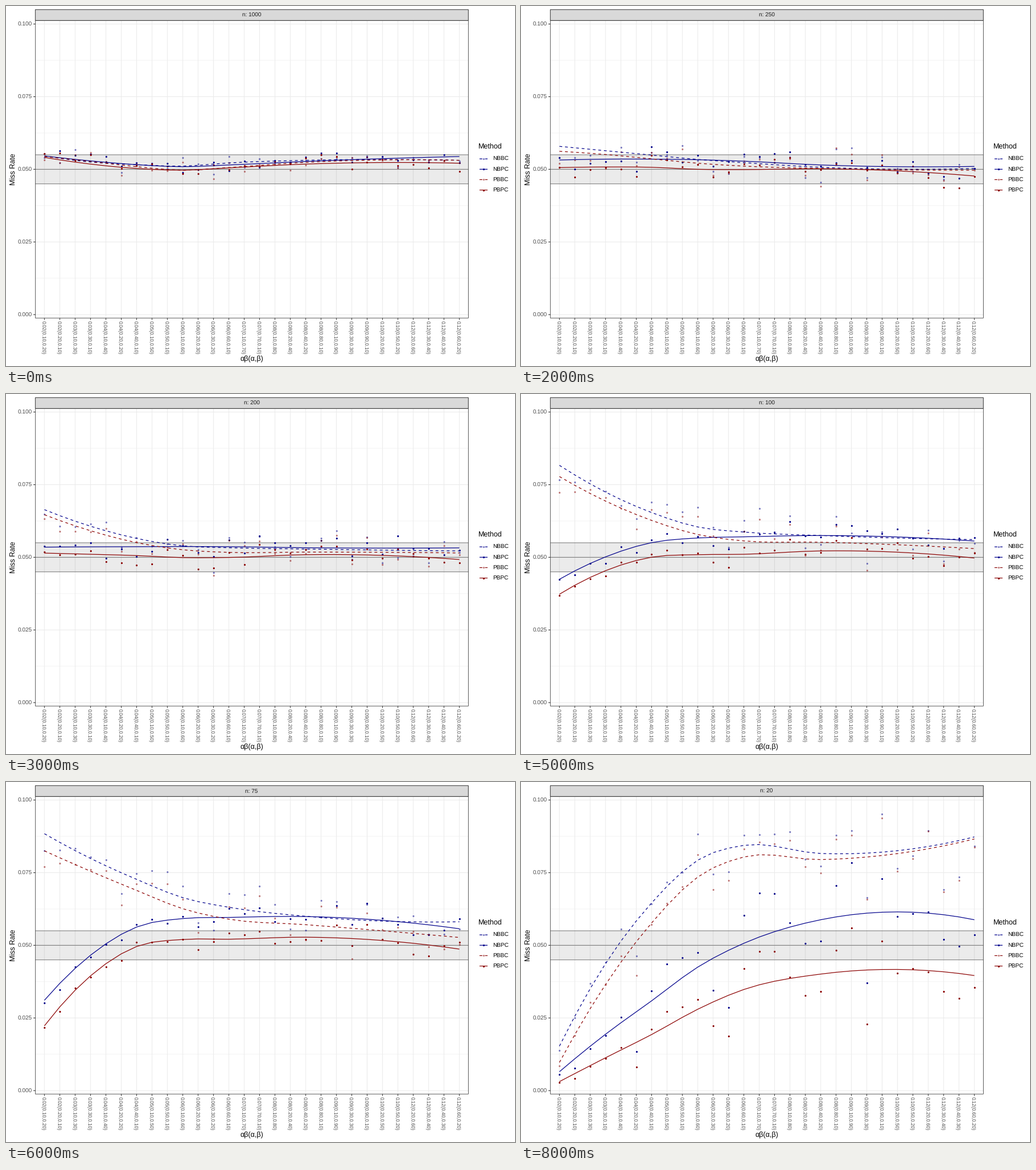
These frames come from a looping animation (890x629 px, 9 s). A matplotlib script:

```python
import numpy as np
import matplotlib.pyplot as plt
from matplotlib.animation import FuncAnimation
from matplotlib.patches import Rectangle

W, H, DPI = 890, 629, 100
PX = 72 / DPI
LEFT, RIGHT, TOP, BOTTOM = 51.3, 808.4, 25.3, 545.2
BLUE, RED = "#00008B", "#8B0000"
GRID, TEXT, EDGE = "#EBEBEB", "#4D4D4D", "#333333"
METHODS = [("NBBC", BLUE, True), ("NBPC", BLUE, False),
           ("PBBC", RED, True), ("PBPC", RED, False)]

# Every pair of tenths whose product lies in 0.02 .. 0.12
PAIRS = sorted(((a, b) for a in range(1, 10) for b in range(1, 10)
                if 2 <= a * b <= 12), key=lambda p: (p[0] * p[1], p[0]))
COUNT = len(PAIRS)
XS = 67.2 + 26.87 * np.arange(COUNT)
KEYS = np.array([0, 3, 6, 9, 12, 17, 27])

# Balanced pairs score low, lopsided pairs high
BALANCE = np.array([abs(np.log2(a / b)) for a, b in PAIRS]) - 1.7


def ypix(rate):
    return 539.2 - 5077 * np.asarray(rate)


def smooth(values):
    """Cubic Hermite curve through the key categories."""
    v = np.asarray(values, float)
    m = np.gradient(v, KEYS, edge_order=2)
    x = np.arange(COUNT)
    i = np.clip(np.searchsorted(KEYS, x, "right") - 1, 0, len(KEYS) - 2)
    h = np.diff(KEYS)[i]
    u = (x - KEYS[i]) / h
    return ((1 + 2 * u) * (1 - u) ** 2 * v[i] + h * u * (1 - u) ** 2 * m[i]
            + u * u * (3 - 2 * u) * v[i + 1] + h * u * u * (u - 1) * m[i + 1])


def state(n, tilt, *curves):
    """Rates in units of 1e-4; tilt is the balance effect for BC and PC."""
    return n, np.array(tilt * 2)[:, None], np.array([smooth(c) for c in curves])


def between(n, a, b):
    return n, (a[1] + b[1]) / 2, (a[2] + b[2]) / 2


def scatter(n, tilt, lines):
    """Dots around the curves; NB and PB share most of their noise."""
    rng = np.random.default_rng(n)
    noise = np.tile(rng.normal(size=(2, COUNT)), (2, 1))
    spread = tilt * BALANCE + (14 + 0.25 * tilt) * noise
    spread += rng.normal(0, 5, lines.shape)
    dots = np.maximum(lines + spread * np.minimum(lines / 500, 1), 20)
    return np.where(dots > 1010, np.nan, dots)


n1000 = state(1000, [8, 5],
              [546, 525, 516, 511, 522, 531, 531],
              [546, 529, 516, 509, 515, 527, 544],
              [544, 527, 509, 497, 506, 524, 531],
              [541, 518, 503, 497, 505, 518, 521])
n250 = state(250, [28, 12],
             [579, 564, 549, 534, 523, 507, 503],
             [532, 535, 535, 533, 528, 515, 510],
             [562, 551, 536, 521, 511, 503, 497],
             [506, 508, 507, 500, 499, 502, 477])
n150 = state(150, [35, 8],
             [749, 650, 581, 545, 543, 550, 541],
             [538, 537, 538, 541, 545, 551, 555],
             [731, 632, 565, 531, 523, 533, 533],
             [523, 513, 505, 498, 500, 516, 508])
n75 = state(75, [45, 15],
            [884, 799, 727, 664, 631, 600, 581],
            [311, 466, 563, 592, 596, 599, 557],
            [825, 755, 689, 626, 590, 571, 527],
            [223, 395, 496, 520, 521, 528, 487])
n50 = state(50, [45, 12],
            [648, 787, 843, 802, 742, 648, 614],
            [172, 394, 543, 612, 629, 615, 587],
            [563, 721, 790, 753, 691, 602, 556],
            [91, 293, 434, 511, 524, 520, 469])
n20 = state(20, [65, 95],
            [153, 437, 646, 793, 844, 816, 873],
            [65, 194, 309, 425, 507, 588, 588],
            [97, 365, 577, 735, 804, 795, 866],
            [31, 113, 193, 280, 348, 401, 396])

STATES = [n1000, between(500, n1000, n250), n250, between(200, n250, n150),
          n150, between(100, n150, n75), n75, n50, n20]

plt.rcParams.update({"font.family": "Liberation Sans", "path.snap": False,
                     "text.hinting": "none"})
fig = plt.figure(figsize=(W / DPI, H / DPI), dpi=DPI, facecolor="white")
ax = fig.add_axes([0, 0, 1, 1])
ax.set(xlim=(0, W), ylim=(H, 0))
ax.axis("off")


def line(x, y, color, width=1.07, z=1, **kw):
    return ax.plot(x, y, color=color, lw=width * PX, zorder=z,
                   solid_capstyle="butt", dash_capstyle="butt", **kw)[0]


def label(x, y, text, size=10, color="black", ha="left", va="baseline", **kw):
    return ax.text(x, y, text, fontsize=size * PX, color=color,
                   ha=ha, va=va, **kw)


def box(x0, y0, x1, y1, z, **kw):
    ax.add_patch(Rectangle((x0, y0), x1 - x0, y1 - y0, zorder=z, **kw))


def series(x, y, color, corrected, z):
    style = (0, (4, 4)) if corrected else "-"
    return line(x, y, color, 1.22, z, linestyle=style)


def dots(x, y, color, corrected, z):
    return ax.plot(x, y, "o", color=color, ms=3.2 * PX, mew=0,
                   alpha=0.5 if corrected else 1, zorder=z)[0]


# Grid, axes and labels
for rate in np.arange(0.0125, 0.1, 0.025):
    line([LEFT, RIGHT], [ypix(rate)] * 2, GRID, 0.55)
for rate in np.arange(5) * 0.025:
    y = ypix(rate)
    line([LEFT, RIGHT], [y, y], GRID)
    line([LEFT - 3.4, LEFT], [y, y], EDGE)
    label(46, y + 3.6, f"{rate:.3f}", color=TEXT, ha="right")
for x, (a, b) in zip(XS, PAIRS):
    line([x, x], [TOP, BOTTOM], GRID)
    line([x, x], [BOTTOM, BOTTOM + 3.4], EDGE)
    label(x - 2.5, 550, f"{a * b / 100:.2f}({a / 10:.2f},{b / 10:.2f})", 8.6,
          TEXT, ha="center", va="top", rotation=270)
label(429.6, 620, "αβ(α,β)", 12.5, ha="center")
label(12.3, 285.2, "Miss Rate", 12.5, ha="center", va="center", rotation=90)

# Tolerance band
box(LEFT, ypix(0.055), RIGHT, ypix(0.045), 2, fc="black", alpha=0.08, lw=0)
for rate in (0.045, 0.05, 0.055):
    line([LEFT, RIGHT], [ypix(rate)] * 2, "#737373", 1, 2)

# Panel frame and strip
box(LEFT, TOP, RIGHT, BOTTOM, 8, fc="none", ec=EDGE, lw=0.8 * PX)
box(LEFT, 6.3, RIGHT, TOP, 8, fc="#D9D9D9", ec=EDGE, lw=PX)
title = label(429.6, 18.8, "", color="#1A1A1A", ha="center", zorder=9)

# Legend
label(826, 249.3, "Method", 12.5)
for i, (name, color, corrected) in enumerate(METHODS):
    y = 267.1 + 18.15 * i
    series([828, 842], [y, y], color, corrected, 4)
    dots([835], [y], color, corrected, 3)
    label(851, y + 3.3, name)

points = [dots(XS, XS, c, bc, 3 + 0.1 * i)
          for i, (_, c, bc) in enumerate(METHODS)]
curves = [series(XS, XS, c, bc, 4 + 0.1 * i)
          for i, (_, c, bc) in enumerate(METHODS)]


def update(frame):
    n, tilt, lines = STATES[frame]
    title.set_text(f"n: {n}")
    for curve, rates in zip(curves, lines):
        curve.set_ydata(ypix(rates / 1e4))
    for point, rates in zip(points, scatter(n, tilt, lines)):
        point.set_ydata(ypix(rates / 1e4))
    return [title, *curves, *points]


anim = FuncAnimation(fig, update, frames=len(STATES), interval=1000,
                     init_func=lambda: update(0), repeat=True, repeat_delay=0)
plt.show()
```
